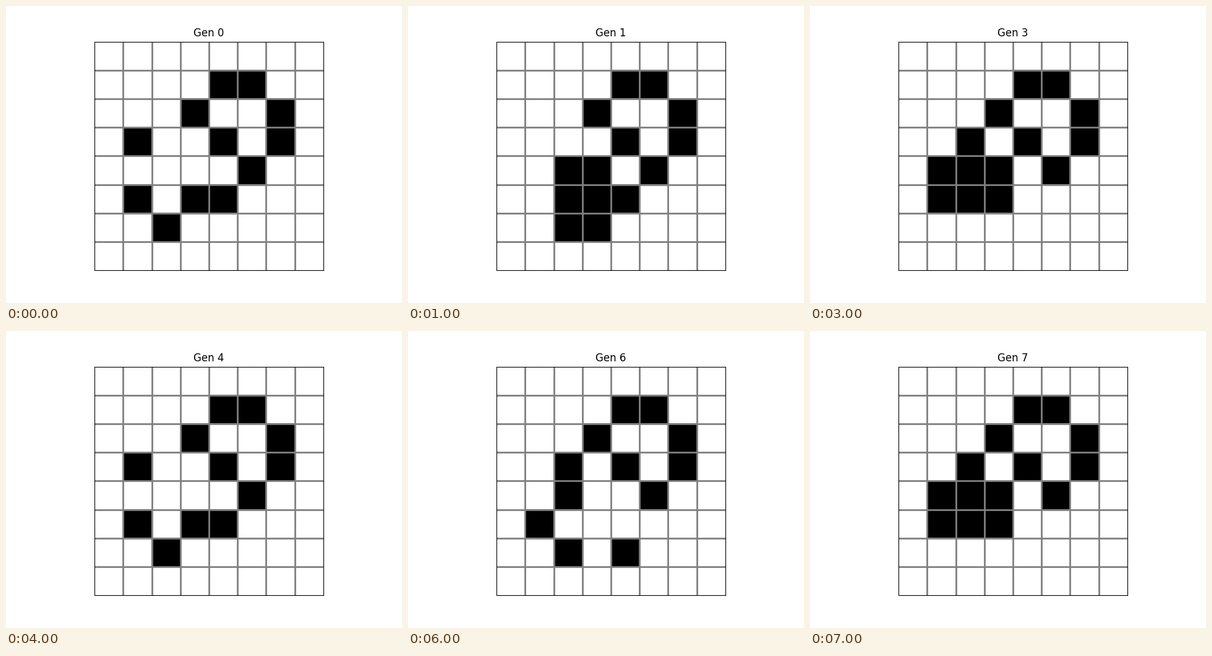
Write a matplotlib script that moves like this. It is 640 px wide and 480 px high and loops after 8 s.

```python
import numpy as np
import matplotlib.pyplot as plt
from matplotlib.animation import FuncAnimation

SIZE = 8
GENERATIONS = 8
INTERVAL = 1000
START = [(1, 4), (1, 5), (2, 3), (2, 6), (3, 1), (3, 4), (3, 6),
         (4, 5), (5, 1), (5, 3), (5, 4), (6, 2)]


def step(grid):
    """Advance Conway's Game of Life by one generation."""
    padded = np.pad(grid, 1)
    blocks = sum(padded[r:r + SIZE, c:c + SIZE]
                 for r in range(3) for c in range(3))
    neighbours = blocks - grid
    return ((neighbours == 3) | ((grid == 1) & (neighbours == 2))).astype(int)


first = np.zeros((SIZE, SIZE), dtype=int)
first[tuple(zip(*START))] = 1
history = [first]
while len(history) < GENERATIONS:
    history.append(step(history[-1]))

fig, ax = plt.subplots(figsize=(6.4, 4.8), dpi=100)
image = ax.imshow(first, cmap="binary", vmin=0, vmax=1,
                  interpolation="nearest")
title = ax.set_title("Gen 0")

# Grid lines only between cells
edges = np.arange(0.5, SIZE - 1)
ax.set_xticks([])
ax.set_yticks([])
ax.set_xticks(edges, minor=True)
ax.set_yticks(edges, minor=True)
ax.grid(which="minor", color="gray", linewidth=2)
ax.tick_params(which="both", length=0)


def update(gen):
    image.set_data(history[gen])
    title.set_text(f"Gen {gen}")
    return image, title


anim = FuncAnimation(fig, update, frames=GENERATIONS, interval=INTERVAL,
                     repeat=True, repeat_delay=0, blit=False)
plt.show()
```
